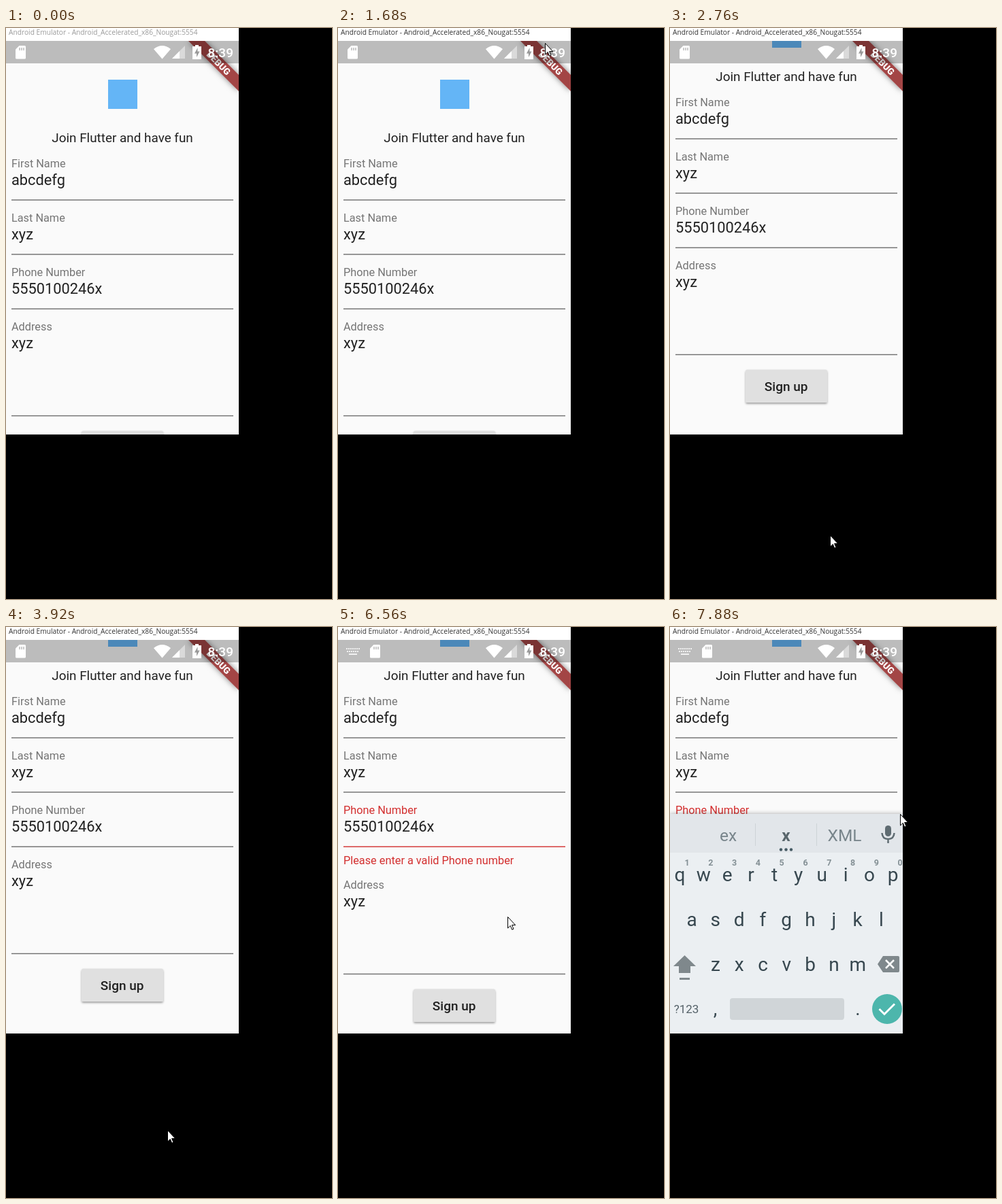
These frames come from a looping animation (479x840 px, 8000 ms). An HTML page:

```html
<!DOCTYPE html>
<html lang="en">
<head>
<meta charset="utf-8">
<title>Sign-up form</title>
<style>
html, body { margin: 0; height: 100%; overflow: hidden; background: #000; }
svg { display: block; width: 100vw; height: 100vh; font-family: Roboto, sans-serif; }
.label { font-size: 16.3px; fill: #757575; }
.value { font-size: 21.8px; fill: #212121; }
.red { fill: #d32f2f !important; }
.key { font-size: 28px; fill: #37474f; }
.hint { font-size: 12.5px; font-weight: 700; fill: #849095; }
.word { font-size: 24.5px; fill: #78858b; }
.key, .hint, .word, .mid { text-anchor: middle; }
</style>
</head>
<body>
<svg id="stage" viewBox="0 0 479 840"></svg>
<script>
const LOOP = 8000;
const text = (x, y, s, cls, extra = '') => `<text x="${x}" y="${y}" class="${cls}" ${extra}>${s}</text>`;
const rect = (x, y, w, h, fill, extra = '') =>
  `<rect x="${x}" y="${y}" width="${w}" height="${h}" fill="${fill}" ${extra}/>`;
const path = (d, fill, extra = '') => `<path d="${d}" fill="${fill}" ${extra}/>`;

// A form field is placed by its underline.
const field = (name, value, line, top = line - 80, id = '') =>
  text(8, top + 32, name, 'label', id && `id="${id}Label"`) +
  text(8, top + 58.4, value, 'value') +
  rect(8, line - .7, 326, 1.4, '#6e6e6e', id && `id="${id}Line"`);

const form = `
<g id="form">
  ${rect(150, 76, 43, 43, '#64b5f6')}
  ${text(171, 168, 'Join Flutter and have fun', 'mid', 'font-size="18.9" fill="#212121"')}
  ${field('First Name', 'abcdefg', 253)}
  ${field('Last Name', 'xyz', 333)}
  ${field('Phone Number', '5550100246x', 413.2, 333, 'phone')}
  ${text(8, 439, 'Please enter a valid Phone number', 'label red', 'id="error"')}
  <g id="lower">
    ${field('Address', 'xyz', 570.5, 413)}
    ${rect(111, 592.5, 120, 48.5, '#e0e0e0', 'rx="2.5" filter="url(#drop)"')}
    ${text(170.7, 623.5, 'Sign up', 'mid', 'font-size="19" font-weight="500" fill="#212121"')}
  </g>
</g>
<path id="touch" d="M226 83H242V85A8 8 0 0 1 226 85Z" fill="#e6e6e6"/>`;

const banner = `
${path('M268 19H292L342 69V93Z', '#a34444', 'filter="url(#shade)"')}
<text class="mid" transform="translate(312.5 51.5) rotate(45)" y="4.8"
  font-size="13.5" font-weight="900" fill="#fff">DEBUG</text>`;

const status = `
${rect(0, 19, 342, 33, '#000', 'opacity=".25"')}
<g fill="#fff">
  <g id="keysIcon" stroke="#fff" stroke-width="2" opacity=".8">
    <path d="M12 32H32M13 36H31" stroke-dasharray="2 1"/><path d="M16 40H28"/>
  </g>
  <g id="card">
    <path d="M19.500 26H27.500Q29 26 29 27.500V44Q29 45.500 27.500 45.500H15.500Q14 45.500 14 44V31.500Z"/>
    <path d="M20 29V33M23 29V33M26 29V33" stroke="#bbb" stroke-width="1.500"/>
  </g>
  <path d="M217 31Q229.500 21 242 31L229.500 45.500Z"/>
  <path d="M244 45L263 26V45Z" opacity=".45"/><path d="M244 45L255 34V45Z"/>
  <path d="M278 25H283V27H287V46H274V27H278Z"/>
  <path d="M281.500 29L277 37.500H280V43L284.500 34.500H281.500Z" fill="#999"/>
  <text x="296.500" y="42.500" font-size="19" font-weight="500">8:39</text>
</g>`;

const row = (letters, x, y, cls = 'key') =>
  [...letters].map((c, i) => text(x + 34.8 * i, y, c, cls)).join('');

const keyboard = `
<g id="keyboard">
  ${rect(0, 275, 342, 323, '#ebeff2', 'filter="url(#glow)"')}
  <g id="words">
    ${rect(0, 275, 342, 57, '#e2e6ea')}
    ${rect(125, 289, 1, 33, '#cdd3d6')}${rect(215, 289, 1, 33, '#cdd3d6')}
    ${text(85.5, 315, 'ex', 'word')}
    ${text(170.5, 315, 'x', 'word', 'style="font-weight:700;fill:#59666c"')}
    ${text(256.5, 315, 'XML', 'word')}
    ${[163, 170.5, 178].map(x => `<circle cx="${x}" cy="327.500" r="2.200" fill="#455a64"/>`).join('')}
    ${rect(316, 292, 9, 16, '#5f6c72', 'rx="4.5"')}
    ${path('M311.500 303Q312 312 320.500 312T329.500 303M320.500 312V318', 'none', 'stroke="#5f6c72" stroke-width="2.5"')}
  </g>
  ${row('1234567890', 25, 350.5, 'hint')}
  ${row('qwertyuiop', 14.5, 374)}
  ${row('asdfghjkl', 32, 440)}
  ${row('zxcvbnm', 67, 506)}
  ${path('M21.500 483L38 499H30V509H13V499H5ZM14 516H29V519H14Z', '#7f888c')}
  ${path('M305 496L313 484H335Q337 484 337 486V506Q337 508 335 508H313Z', '#7f888c')}
  ${path('M317 490L329 502M329 490L317 502', 'none', 'stroke="#fff" stroke-width="2.5"')}
  ${text(24, 568, '?123', 'mid', 'font-size="17" fill="#546168"')}
  ${text(66.5, 571, ',', 'key')}${text(276, 571, '.', 'key')}
  ${rect(88, 546, 168, 32, '#d0d5d8', 'rx="4"')}
  <circle cx="319" cy="562" r="22" fill="#4db6ac"/>
  ${path('M307.500 562L315 569.500L330 554.500', 'none', 'stroke="#fff" stroke-width="3"')}
</g>`;

const glow = (id, dy, blur, alpha) =>
  `<filter id="${id}" x="-20%" y="-20%" width="140%" height="140%">
    <feDropShadow dx="0" dy="${dy}" stdDeviation="${blur}" flood-opacity="${alpha}"/></filter>`;

const stage = document.getElementById('stage');
stage.innerHTML = `
<defs>
  <clipPath id="screen"><rect y="19" width="342" height="579"/></clipPath>
  ${glow('drop', 2, 1.5, .35)}${glow('shade', 0, 4, .5)}${glow('glow', 0, 3, .35)}
</defs>
${rect(0, 0, 479, 840, '#000')}
${rect(0, 0, 342, 19, '#fff')}
<text id="title" x="4" y="10" font-size="10.200" font-family="'Open Sans', 'Noto Sans', sans-serif">Android Emulator - Android_Accelerated_x86_Nougat:5554</text>
<g clip-path="url(#screen)">
  ${rect(0, 19, 342, 579, '#fafafa')}
  ${form}${banner}${status}${keyboard}
</g>
<path id="pointer" d="M.5 .5V17L4.300 13.400L6.700 19.200L9 18.200L6.600 12.500H11.700Z" fill="#fff" stroke="#000"/>`;

// Pointer moves: start, end, number of steps, then evenly timed points.
const moves = [
  [910, 1220, 5, [372, 652], [328, 247]],
  [1450, 1680, 4, [324, 190], [304, 22]],
  [1830, 2600, 11, [320, 70], [370, 393], [357, 560], [300, 740], [240, 797], [234, 762]],
  [2680, 2830, 3, [234, 752], [236, 740]],
  [3920, 4000, 2, [237, 740], [236, 740]],
  [4470, 5080, 9, [237, 740], [241, 744], [262, 404]],
  [5250, 5320, 2, [256, 415], [249, 426]],
  [7420, 7880, 7, [260, 408], [338, 275]]
];

const clamp = v => Math.max(0, Math.min(1, v));
const $ = id => document.getElementById(id);
const show = (id, on) => $(id).setAttribute('visibility', on ? 'visible' : 'hidden');
const shift = (id, x, y) => $(id).setAttribute('transform', `translate(${x} ${y})`);
const fade = (id, a) => $(id).setAttribute('opacity', a);

function pointerAt(t) {
  const move = moves.filter(m => t >= m[0]).pop();
  if (!move) return null;
  const [start, end, steps, ...pts] = move;
  const u = Math.floor(clamp((t - start) / (end - start)) * (steps - 1) + .05) / (steps - 1);
  const p = u * (pts.length - 1), i = Math.min(Math.floor(p), pts.length - 2);
  return [0, 1].map(k => Math.round(pts[i][k] + (pts[i + 1][k] - pts[i][k]) * (p - i)));
}

function draw(t) {
  const pos = pointerAt(t);
  show('pointer', pos);
  if (pos) shift('pointer', ...pos);
  $('title').setAttribute('fill', t < 1600 ? '#9a9a9a' : '#333');

  const left = 1 - clamp((t - 1830) / 300);
  shift('form', 0, -90 * (1 - left * left));
  show('touch', t >= 2130 && t < 2220);

  shift('lower', 0, t < 4160 ? 0 : 30);
  fade('error', clamp((t - 4400) / 230) * (t >= 4470));
  for (const id of ['phoneLabel', 'phoneLine']) $(id).classList.toggle('red', t >= 4470);

  show('keysIcon', t >= 6560);
  shift('card', t < 6560 ? 0 : 33, 0);
  show('keyboard', t >= 6960);
  shift('keyboard', 0, t < 7040 ? 20 : 0);
  fade('keyboard', t < 7040 ? .6 : 1);
  fade('words', t < 7420 ? 0 : 1);
}

function tick() {
  draw(performance.now() % LOOP);
  requestAnimationFrame(tick);
}
tick();
</script>
</body>
</html>
```
